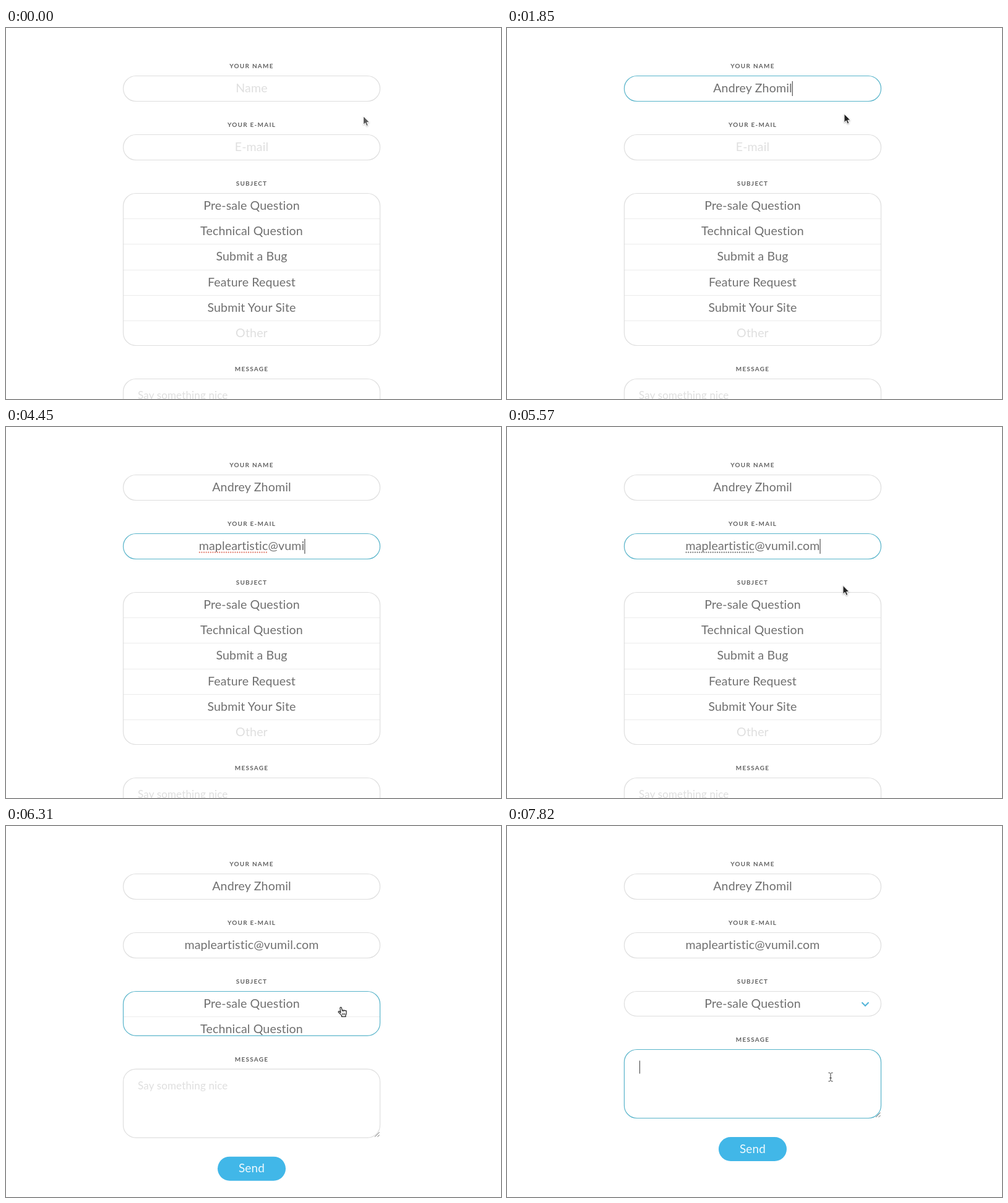
An HTML page for the animation above (8 s loop, 800 px wide and 600 px high).

```html
<!DOCTYPE html>
<html lang="en">
<head>
<meta charset="utf-8">
<title>Contact form</title>
<style>
  html, body { margin: 0; width: 100%; height: 100%; overflow: hidden; background: #fff; }
  svg { display: block; width: 800px; height: 600px; }
  text { font: 400 19.6px Lato, "Open Sans", sans-serif; letter-spacing: .14px; fill: #707070; text-anchor: middle; white-space: pre; }
  .label { font-size: 10px; font-weight: 700; letter-spacing: 1.25px; fill: #626262; }
  .hint { fill: #dfdfdf; }
  .note { font-size: 17px; letter-spacing: .15px; text-anchor: start; }
  .send { font-size: 19px; fill: #eff9fd; }
  .box { fill: none; stroke-width: 1.2; }
  .divider { stroke: #ececec; }
  .caret { stroke: #555; stroke-width: 1.2; }
  .spell { stroke-width: 2.2; stroke-linecap: round; stroke-dasharray: 0 3.6; }
</style>
</head>
<body>
<svg viewBox="0 0 800 600">
  <defs><clipPath id="listClip"><rect id="listMask" x="189" y="267" width="416" rx="21"/></clipPath></defs>

  <text class="label" x="397" y="65">YOUR NAME</text>
  <rect class="box" id="nameBox" x="189.5" y="77.5" width="415" height="41" rx="20.5"/>
  <text class="hint" id="nameHint" x="397" y="104">Name</text>
  <text id="nameText" x="397" y="104"></text>

  <text class="label" x="397" y="160">YOUR E-MAIL</text>
  <rect class="box" id="mailBox" x="189.5" y="172.5" width="415" height="41" rx="20.5"/>
  <text class="hint" id="mailHint" x="397" y="199">E-mail</text>
  <text id="mailText" x="397" y="199"></text>
  <line class="spell" id="spell" y1="202.7" y2="202.7"/>

  <text class="label" x="397" y="255">SUBJECT</text>
  <g id="list" clip-path="url(#listClip)"></g>
  <rect class="box" id="listBox" x="189.5" y="267.5" width="415" rx="20.5"/>
  <path id="chevron" d="M573.5 285.3l5.5 5.5 5.5-5.5" fill="none" stroke="#52b4d8" stroke-width="2"/>

  <g id="lower">
    <text class="label" x="397" y="41">MESSAGE</text>
    <rect class="box" id="noteBox" x="189.5" y="53.5" width="415" height="111" rx="20.5"/>
    <text class="hint note" id="noteHint" x="213" y="86.5">Say something nice</text>
    <path d="M596 163l7.5-7.5M600.5 163l3-3" stroke="#666"/>
    <rect x="342" y="195" width="110" height="39" rx="19.5" fill="#41b7e8"/>
    <text class="send" x="397" y="220.5">Send</text>
  </g>

  <line class="caret" id="caret"/>

  <g id="cursor">
    <path id="arrow" d="M0 0V14L3.2 11 5.3 16 7.8 15 5.7 10.2H10Z" fill="#222" stroke="#fff" stroke-width="1"
      style="filter:drop-shadow(0 1px 1px rgba(0,0,0,.3))"/>
    <path id="beam" d="M-3.5-7q3 0 3.5 1.5q.5-1.5 3.5-1.5M0-5.5V5.5M-3.5 7q3 0 3.5-1.5q.5 1.5 3.5 1.5M-1.7 1.5h3.4" fill="none" stroke="#333"/>
    <g id="hand" transform="translate(-5.2 -.5)" stroke="#222" stroke-width="1.2" fill="#fff">
      <path d="M4.6 10 3.6 2.1a1.25 1.25 0 0 1 2.5-.3L7.1 6.2a1.2 1.2 0 0 1 2.3 .2 1.2 1.2 0 0 1 2.3 .4 1.1 1.1 0 0 1 2.1 .8V11.2L12.6 14V15.8H6.2V14.2L3 10.6 .9 8.6a1.2 1.2 0 0 1 1.8-1.4Z"/>
      <path d="M7.3 10v3.4M9.3 10v3.4M11.3 10v3.4" stroke-width=".9"/>
    </g>
  </g>
</svg>

<script>
const LOOP = 8000, FADE = 270;
const NAME = "Andrey Zhomil";
const MAIL = "mapleartistic@vumil.com";
const SUBJECTS = ["Pre-sale Question", "Technical Question", "Submit a Bug", "Feature Request", "Submit Your Site", "Other"];
const GRAY = [222, 222, 222], TEAL = [88, 180, 202];
const CLICK = { name: 310, mail: 2000, list: 5890, note: 7550 };

// Bursts of key presses: [start, interval, count]
const NAME_KEYS = [[780, 50, 7], [1280, 50, 6]];
const MAIL_KEYS = [[2670, 80, 8], [3430, 100, 2], [3730, 100, 3], [4130, 80, 10]];

// Pointer path: [time, x, y]
const PATH = [
  [100, 577.5, 142.5], [300, 545, 98], [1730, 545, 98], [1850, 545, 138], [1910, 544, 190],
  [5450, 543, 190], [5570, 543, 256], [5690, 541.5, 293], [7170, 541.5, 293], [7350, 523, 406]
];

const $ = id => document.getElementById(id);
const clamp = v => Math.min(1, Math.max(0, v));
const progress = (t, from, to) => clamp((t - from) / (to - from));
const lerp = (a, b, p) => a + (b - a) * p;
const within = (v, from, to) => v >= from && v < to;
const set = (el, attrs) => { for (const k in attrs) el.setAttribute(k, attrs[k]); };
const show = (el, on) => { el.style.display = on ? "" : "none"; };

// cubic-bezier(.25, .1, .25, 1)
function ease(p) {
  let lo = 0, hi = 1, s = p;
  for (let i = 0; i < 20; i++) {
    s = (lo + hi) / 2;
    if (.75 * s * (1 - s) + s ** 3 < p) lo = s; else hi = s;
  }
  return .3 * s * (1 - s) ** 2 + 3 * s * s * (1 - s) + s ** 3;
}

const typed = (t, bursts) => bursts.reduce((sum, [start, gap, count]) =>
  sum + (t < start ? 0 : Math.min(count, Math.floor((t - start) / gap) + 1)), 0);

const focus = (t, from, to = LOOP) =>
  ease(progress(t, from, from + FADE)) * (1 - ease(progress(t, to, to + FADE)));

const tint = (id, p) => set($(id), { stroke: `rgb(${GRAY.map((c, i) => Math.round(lerp(c, TEAL[i], p)))})` });

$("list").innerHTML = SUBJECTS.map((label, i) => {
  const line = Math.round(267 + 41.2 * i) + .5;
  return (i ? `<line class="divider" x1="190" x2="604" y1="${line}" y2="${line}"/>` : "") +
    `<text x="397" y="${294 + 41.2 * i}"${i === 5 ? ' class="hint"' : ""}>${label}</text>`;
}).join("");

function pointerAt(t) {
  const next = PATH.findIndex(p => p[0] > t);
  if (next === 0) return PATH[0].slice(1);
  if (next < 0) return PATH[PATH.length - 1].slice(1);
  const a = PATH[next - 1], b = PATH[next], p = progress(t, a[0], b[0]);
  return [lerp(a[1], b[1], p), lerp(a[2], b[2], p)];
}

function drawField(id, value, count, level) {
  const text = $(id + "Text");
  text.textContent = value.slice(0, count);
  $(id + "Hint").style.opacity = count ? 0 : 1 - level;
  tint(id + "Box", level);
  return count ? text.getComputedTextLength() : 0;
}

function drawCaret(t, nameWidth, mailWidth, bottom) {
  const caret = $("caret");
  const place = (x, y, h) => set(caret, { x1: x, x2: x, y1: y, y2: y + h });
  const onMail = within(t, CLICK.mail, CLICK.list) && !within(t, 5150, 5450);
  const onName = within(t, CLICK.name, CLICK.mail);
  if (onName) place(397.5 + nameWidth / 2, 86, 24);
  else if (onMail) place(397.5 + mailWidth / 2, 181, 24);
  else place(214.5, bottom + 71.5, 21);
  show(caret, onName || onMail || t >= CLICK.note);
}

function drawPointer(t, bottom) {
  const [x, y] = pointerAt(t);
  const top = bottom + 53;
  const beam = within(y, 77, 119) || within(y, 172, 214) || within(y, top, top + 112);
  const hand = within(y, 267, bottom);
  show($("beam"), beam);
  show($("hand"), hand);
  show($("arrow"), !beam && !hand);
  const cursor = $("cursor");
  set(cursor, { transform: `translate(${x} ${y})` });
  cursor.style.opacity = lerp(.75, 1, progress(t, 100, 200));
  show(cursor, !within(t, 780, 1730) && !within(t, 2670, 5450));
}

function draw(t) {
  const mailCount = typed(t, MAIL_KEYS);
  const nameWidth = drawField("name", NAME, typed(t, NAME_KEYS), focus(t, CLICK.name, CLICK.mail));
  const mailWidth = drawField("mail", MAIL, mailCount, focus(t, CLICK.mail, CLICK.list));

  const word = MAIL.indexOf("@"), misspelt = mailCount > word && t < CLICK.list;
  show($("spell"), misspelt);
  if (misspelt) {
    const left = 397 - mailWidth / 2;
    set($("spell"), {
      x1: left + 1.2, x2: left + $("mailText").getSubStringLength(0, word) - 1,
      stroke: t < 5450 ? "#df7868" : "#777"
    });
  }

  const height = lerp(247, 41, ease(progress(t, 5875, 6670)));
  const bottom = 267 + height;
  set($("listMask"), { height });
  set($("listBox"), { height: height - 1 });
  tint("listBox", focus(t, CLICK.list, CLICK.note));
  $("chevron").style.opacity = progress(t, 6400, 6670);

  const noteLevel = focus(t, CLICK.note);
  set($("lower"), { transform: `translate(0 ${bottom})` });
  tint("noteBox", noteLevel);
  $("noteHint").style.opacity = 1 - noteLevel;

  drawCaret(t, nameWidth, mailWidth, bottom);
  drawPointer(t, bottom);
}

const begin = performance.now();
function tick() {
  draw((performance.now() - begin) % LOOP);
  requestAnimationFrame(tick);
}
tick();
</script>
</body>
</html>
```
